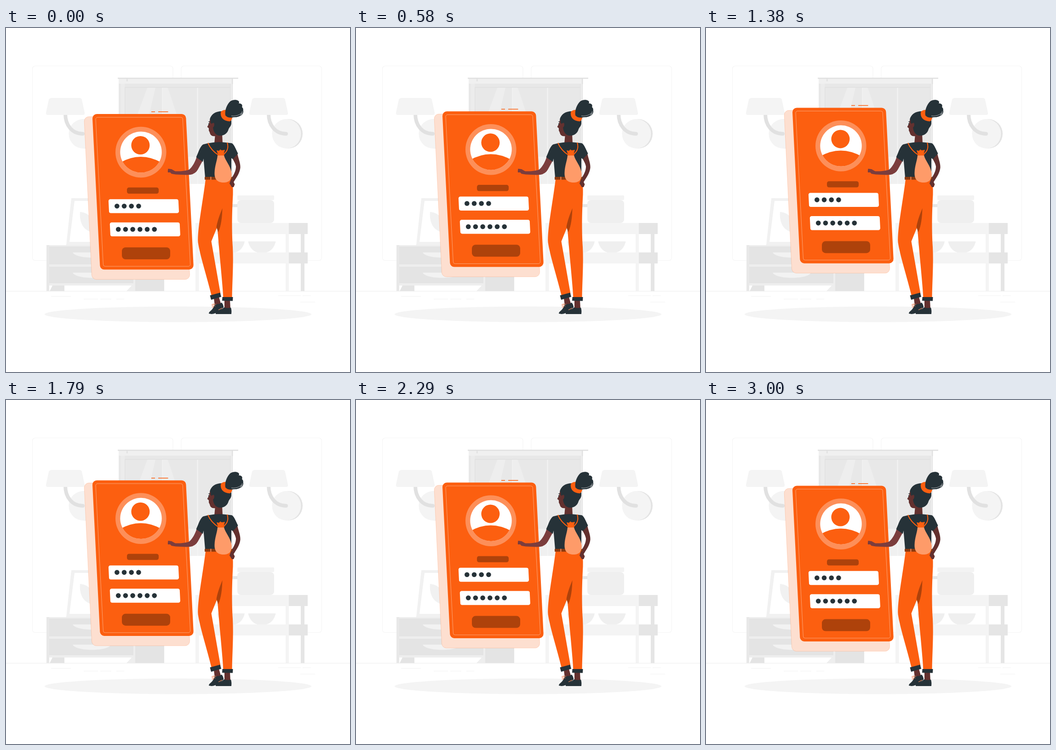
Recreate the animation shown at these times as an HTML page with a canvas. Size 748x748 px, loop 3040 ms.

```html
<!DOCTYPE html>
<html lang="en">
<head>
<meta charset="utf-8">
<title>Login card</title>
<style>
html, body { margin: 0; width: 100%; height: 100%; overflow: hidden; background: #fff; }
canvas { display: block; width: 748px; height: 748px; }
</style>
</head>
<body>
<canvas id="stage" width="748" height="748"></canvas>
<script>
const ctx = document.getElementById('stage').getContext('2d');
const LOOP = 3040, LIFT = 15;
const ORANGE = '#fc5f10', RUST = '#ae420b', INK = '#263238';
const SKIN = '#7b3d3d', SHADE = '#63312f';

function fill(d, color) {
  ctx.fillStyle = color;
  ctx.fill(new Path2D(d));
}
function line(d, color, width = 1, cap = 'butt') {
  ctx.strokeStyle = color;
  ctx.lineWidth = width;
  ctx.lineCap = cap;
  ctx.stroke(new Path2D(d));
}
function box(x, y, w, h, color, r = 0) {
  ctx.fillStyle = color;
  ctx.beginPath();
  ctx.roundRect(x, y, w, h, r);
  ctx.fill();
}
function oval(x, y, rx, ry, color) {
  ctx.fillStyle = color;
  ctx.beginPath();
  ctx.ellipse(x, y, rx, ry, 0, 0, Math.PI * 2);
  ctx.fill();
}
// Upright sheet leaning to the right at its foot, with round corners
function sheet(x, y, w, h, lean, r) {
  const p = [[x, y], [x + w, y], [x + w + lean, y + h], [x + lean, y + h]];
  const path = new Path2D();
  path.moveTo(x + w / 2, y);
  for (let i = 1; i <= 4; i++) path.arcTo(...p[i % 4], ...p[(i + 1) % 4], r);
  path.closePath();
  return path;
}

function lamp(dx) {
  ctx.save();
  ctx.translate(dx, 0);
  oval(613.5, 230, 31.5, 32, '#e3e3e3');
  oval(610, 230, 31.5, 32, '#f4f4f4');
  line('M571 186C571 212 586 230 609 230', '#e1e1e1', 8, 'round');
  fill('M541 152H601Q606 152 607 156L613 184Q614 189 609 189H533Q528 189 529 184L535 156Q537 152 541 152Z', '#f4f4f4');
  ctx.restore();
}

function curtains() {
  box(245, 110, 248, 229, '#f0f0f0');
  box(245, 121, 243, 159, '#e8e8e8');
  box(250, 121, 8, 159, '#ececec');
  box(258, 128, 230, 2, '#e2e2e2');
  box(258, 128, 1.5, 152, '#e2e2e2');
  fill('M307 130H325L311 190H285ZM341 130H352L372 190H341Z', '#eeeeee');
  box(339, 130, 2, 150, '#f1f1f1');
  box(415.5, 130, 2, 209, '#f4f4f4');
  box(487, 121, 6, 218, '#e4e4e4');
  box(489, 121, 2, 218, '#f0f0f0');
  box(243, 108, 262, 2.5, '#e1e1e1');
  box(262, 109, 2.5, 7, '#e1e1e1');
  box(491, 109, 2.5, 13, '#e1e1e1');
}

function cabinet() {
  fill('M142 370H210L205 472H131Z', '#f1f1f1');
  fill('M149 376H210V465H138Z', '#fff');
  fill('M161 400C176 401 186 410 187 421V444C170 440 159 426 161 400Z', '#f1f1f1');
  box(88, 472, 193, 88, '#eeeeee');
  box(281, 472, 63, 100, '#e4e4e4');
  box(88, 472, 6, 100, '#e8e8e8');
  for (const y of [475, 519]) {
    box(94, y, 183, y === 475 ? 39 : 36, '#e4e4e4');
    fill(`M145 ${y + 13}H228C222 ${y + 28} 152 ${y + 28} 145 ${y + 13}Z`, '#f2f2f2');
  }
  fill('M101 560H127V572H95Z', '#e4e4e4');
  fill('M277 556H281V572H262Z', '#eeeeee');
}

function table() {
  box(641, 447, 8, 125, '#e5e5e5');
  box(608, 447, 7, 125, '#f4f4f4');
  box(412, 424, 7.5, 148, '#f4f4f4');
  for (const y of [424, 488]) {
    box(412, y, 203, 24, '#f4f4f4');
    box(615, y, 41, 24, '#e5e5e5');
  }
  for (const x of [459, 526.5])
    fill(`M${x} 464H${x + 60}C${x + 57} 479 ${x + 46} 488 ${x + 38} 488H${x + 22}C${x + 14} 488 ${x + 3} 479 ${x} 464Z`, '#efefef');
  box(490, 383, 16, 6.5, '#e6e6e6');
  box(503, 374, 80, 50, '#efefef', 8);
  box(503, 364, 80, 10, '#f3f3f3', 2);
}

function room() {
  ctx.fillStyle = '#fff';
  ctx.fillRect(0, 0, 748, 748);
  ctx.strokeStyle = '#f5f5f5';
  ctx.lineWidth = 1.2;
  for (const x of [57.5, 381]) {
    ctx.beginPath();
    ctx.roundRect(x, 82.5, 305.5, 423, 6);
    ctx.stroke();
  }
  curtains();
  lamp(-442);
  lamp(0);
  cabinet();
  table();
  line('M0 572.3H748', '#ededed');
  line('M98 583.5H141M169 589.5H200M205 589.5H229M240 589.5H257M592 582H641M645 582H663M640 596H672', '#f2f2f2');
  oval(374, 622.5, 290, 17, '#f4f4f4');
}

function avatar() {
  oval(293.3, 270, 55.3, 55.3, '#fd8f59');
  ctx.save();
  ctx.beginPath();
  ctx.ellipse(293.5, 269.8, 45.2, 44.6, 0, 0, Math.PI * 2);
  ctx.clip();
  box(240, 220, 110, 100, '#fff');
  fill('M240 298Q266 280 293 280Q320 280 347 298V320H240Z', ORANGE);
  ctx.restore();
  oval(292.4, 255, 20, 20, ORANGE);
}

function field(x, y, dots) {
  ctx.fillStyle = '#fff';
  ctx.fill(sheet(x, y, 152, 30.4, 1.5, 4));
  for (let i = 0; i < dots; i++) oval(x + 18.6 + i * 15.7, y + 15, 5.3, 5.3, INK);
}

function card(dy) {
  ctx.save();
  ctx.translate(0, dy);
  const back = sheet(169.7, 192.7, 213, 354, 17.3, 10);
  ctx.fillStyle = '#fddfd0';
  ctx.fill(back);
  ctx.strokeStyle = 'rgba(252,95,16,.4)';
  ctx.lineWidth = .5;
  ctx.stroke(back);
  ctx.fillStyle = ORANGE;
  ctx.fill(sheet(187.5, 187, 203.5, 338.3, 17.2, 9.5));
  ctx.strokeStyle = '#fdb38b';
  ctx.lineWidth = .8;
  ctx.stroke(sheet(194.8, 194.2, 189.3, 324, 16.8, 4));
  line('M316 182.2H324M331 182.2H352.5', ORANGE, 1.5);
  avatar();
  box(263, 346.8, 69, 13.4, RUST, 4.5);
  field(222.7, 372.2, 4);
  field(225.6, 422.7, 6);
  box(252, 477, 105, 26, RUST, 8);
  ctx.restore();
}

function legs() {
  // ankles and shoes
  fill('M452 588L463 585L468 602L454 604Z', SHADE);
  fill('M475 592H487L488 611H475Z', SHADE);
  fill('M441 621Q441 618 445 615Q452 609 454 600Q462 602 469 597Q473 602 473 607Q470 612 463 615Q455 622 447 622Z', INK);
  fill('M456 622Q455 618 461 615Q470 612 474 607.5Q481 610 489 608Q491 614 490 622Z', INK);
  line('M455 605C449 598 446 602 449 604C455 606 449 609 448 606M457 601L450 600M462 613L470 609', '#f5895d', 1.1);
  // trousers
  fill('M434 329H491Q494 340 493.5 362C491 410 491 440 493 476C495 514 492 550 491.5 588H472.5C471 555 465 505 459.5 432L446.5 464L466.5 578L447 582.5C437 541 422 496 417.5 466C416 438 427 384 434 329Z', ORANGE);
  fill('M470.5 392C464 408 459 422 457.5 433L461.5 444C468 430 470 410 470.5 392Z', RUST);
  fill('M443.5 581.5L465.5 575.5L468 584.5L446 591Z', INK);
  fill('M470.5 585H493.5L493 593.5L470 593Z', INK);
}

function torso() {
  fill('M503 273C506 286 510 294 509.5 304C508 317 499 328 495 335L497.5 340L495 346H491L486 338L489 329C496 318 500 310 500 301C498 292 494 288 492 282Z', SHADE);
  fill('M416 276C412 290 405 303 398 308C389 311 376 312 368 311.5L360 307L352.5 306Q351.5 311 352 314L357 314L360 317L369 318.5C382 319 391 320 401 319Q412 317 417 308L428 288Z', SKIN);
  fill('M455 230H470L471 251H453Z', SHADE);
  fill('M440 250.5Q461 246 482 249.5L491 250.5C496 253 500 264 504.5 273L493.5 285L490 283V325H433L429.5 284L428 291L413.5 281C419 269 422 257 429 253Z', INK);
  box(432, 323.8, 60, 6, '#8b390e');
  box(444.5, 323.5, 1.8, 6.5, '#fd8f59');
}

function bag() {
  line('M439 250C444 262 452 270 463 277M481 249C485 262 480 269 472 276', ORANGE, 2);
  fill('M460 277H474C477 289 488 299 490.5 315C492 331 484 336 473 336C461 336 453 330 453.5 315C454 299 459 289 460 277Z', '#fe9b69');
  fill('M458 266L463 267L466 264L469 266L476 265L473 275H461Z', ORANGE);
  box(460, 274.3, 14.5, 3, ORANGE, 1.5);
}

function head() {
  fill('M445 196C442 202 442 207 441 209L437.5 215L441 218L441 223L443 227C444 233 448 236 455 235L468 234L470 200Z', SHADE);
  line('M440.8 207V211M440 204L444 203', INK, 1.2);
  fill('M443 199C446 187 456 181 469 181C484 184 491 195 490 207C490 213 486 215 484 220C481 231 472 235 463 234C454 232 450 223 450 214L453 207Q449 205 447 209L445 205Q446 200 443 199Z', INK);
  fill('M446 209Q449 206 453 209Q453 215 449 217L446 213Z', SHADE);
  fill('M467 183Q470 178 478 178L483 190Q488 193 492 193Q492 200 487 203Q476 203 470 196Q466 190 467 183Z', ORANGE);
  fill('M477 190C475 178 481 166 487 160C493 155 505 155 507 161C507 163 506 164 506 164C513 163 515 169 513 172C518 175 516 184 511 187C508 194 499 194 494 194Q483 197 477 190Z', INK);
  line('M489 193.5C503 194.5 516 191 515.5 180', INK, 1.3);
  line('M490 191C502 193 512 187 514 181', '#fff', .6);
}

function draw(now) {
  const p = (now % LOOP) / LOOP;
  const rise = 1 - Math.abs(1 - 2 * p);
  room();
  card(-LIFT * rise);
  legs();
  torso();
  bag();
  head();
}

let start;
function tick(now) {
  start ??= now;
  draw(now - start);
  requestAnimationFrame(tick);
}
draw(0);
requestAnimationFrame(tick);
</script>
</body>
</html>
```
